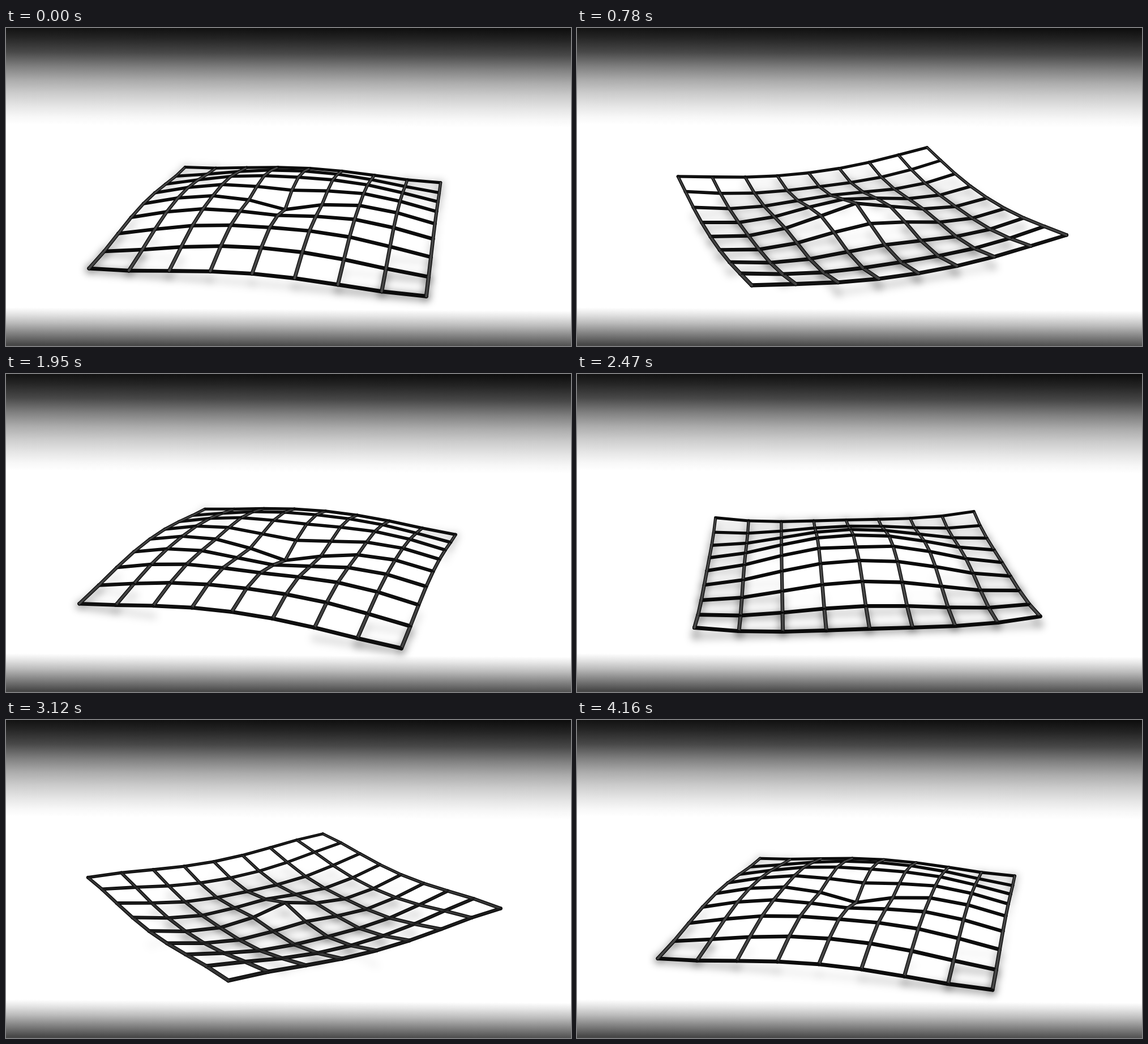
An HTML page with a canvas for the animation above (4.29 s loop, 998 by 561 pixels).

```html
<!DOCTYPE html>
<html lang="en">
<head>
<meta charset="utf-8">
<title>Rippling grid</title>
<style>
  html, body { margin: 0; width: 100%; height: 100%; overflow: hidden; background: #fff; }
  body {
    background: linear-gradient(180.35deg,
      #0c0c0c 0, #242424 22px, #484848 48px, #808080 74px, #acacac 98px,
      #cbcbcb 120px, #e6e6e6 144px, #f7f7f7 162px, #fff 176px,
      #fff 499px, #e6e6e6 510px, #bcbcbc 526px, #8a8a8a 542px, #484848 564px) no-repeat;
  }
  canvas { display: block; width: 998px; height: 561px; }
</style>
</head>
<body>
<canvas id="stage" width="998" height="561"></canvas>
<script>
const W = 998, H = 561, STEP = 130, FRAMES = 33, CELLS = 8;
const CX = 493, CY = 322, SCALE = 371;
const SIN = 0.351, COS = 0.936, DIST = 4.52;
const AMP = 0.0518, GROUND = -1.1;
const rad = deg => deg * Math.PI / 180;

const ctx = document.getElementById('stage').getContext('2d');
const shade = document.createElement('canvas');
shade.width = W;
shade.height = H;
const sctx = shade.getContext('2d');
ctx.lineCap = sctx.lineCap = 'round';

// The sheet's corners lie at radius 1; z is in units of the wave height.
function project(x, y, z) {
  const h = z * AMP;
  const s = 1 / (1 + (y * COS - h * SIN) / DIST);
  return { x: CX + SCALE * x * s, y: CY - SCALE * (y * SIN + h * COS) * s, s };
}

function vertex(i, j, turn, phase) {
  const u = (i / CELLS - 0.5) * Math.SQRT2;
  const v = (j / CELLS - 0.5) * Math.SQRT2;
  const x = u * Math.cos(turn) - v * Math.sin(turn);
  const y = u * Math.sin(turn) + v * Math.cos(turn);
  const z = Math.sin(phase + rad(270) * Math.hypot(u, v));
  return { z, top: project(x, y, z), floor: project(x, y, GROUND) };
}

function segments(turn, phase) {
  const grid = [];
  for (let i = 0; i <= CELLS; i++) {
    grid.push([]);
    for (let j = 0; j <= CELLS; j++) grid[i].push(vertex(i, j, turn, phase));
  }
  const list = [];
  const tone = k => Math.round(10 + 62 * k * k);
  const gu = tone(Math.sin(turn)), gv = tone(Math.cos(turn));
  const add = (a, b, gray) => list.push({ a, b, gray, s: (a.top.s + b.top.s) / 2 });
  for (let i = 0; i <= CELLS; i++) {
    for (let j = 0; j <= CELLS; j++) {
      if (i < CELLS) add(grid[i][j], grid[i + 1][j], gu);
      if (j < CELLS) add(grid[i][j], grid[i][j + 1], gv);
    }
  }
  return list;
}

function line(c, p, q, width, color) {
  c.lineWidth = width;
  c.strokeStyle = color;
  c.beginPath();
  c.moveTo(p.x, p.y);
  c.lineTo(q.x, q.y);
  c.stroke();
}

function draw(n) {
  const m = n + 0.25 * Math.max(0, 1 - n / 6);
  const list = segments(rad(-12.4 + 5.625 * m), rad(22.5 * m));

  // Soft shadow on the floor wherever the sheet hangs low.
  sctx.clearRect(0, 0, W, H);
  for (const { a, b, s } of list) {
    const low = (-(a.z + b.z) / 2 - 0.1) / 0.9;
    if (low > 0) line(sctx, a.floor, b.floor, 11 * s, `rgba(0,0,0,${0.27 * low * s * s})`);
  }
  ctx.clearRect(0, 0, W, H);
  ctx.filter = 'blur(7px)';
  ctx.drawImage(shade, 0, 0);
  ctx.filter = 'none';

  for (const { a, b, s } of list) line(ctx, a.top, b.top, 5.9 * s, '#080808');
  for (const { a, b, s, gray } of list) {
    line(ctx, a.top, b.top, 5.9 * s - 2.6, `rgb(${gray},${gray},${gray})`);
  }
}

let shown = -1;
function tick() {
  const n = Math.floor(performance.now() / STEP) % FRAMES;
  if (n !== shown) draw(shown = n);
  requestAnimationFrame(tick);
}
tick();
</script>
</body>
</html>
```
